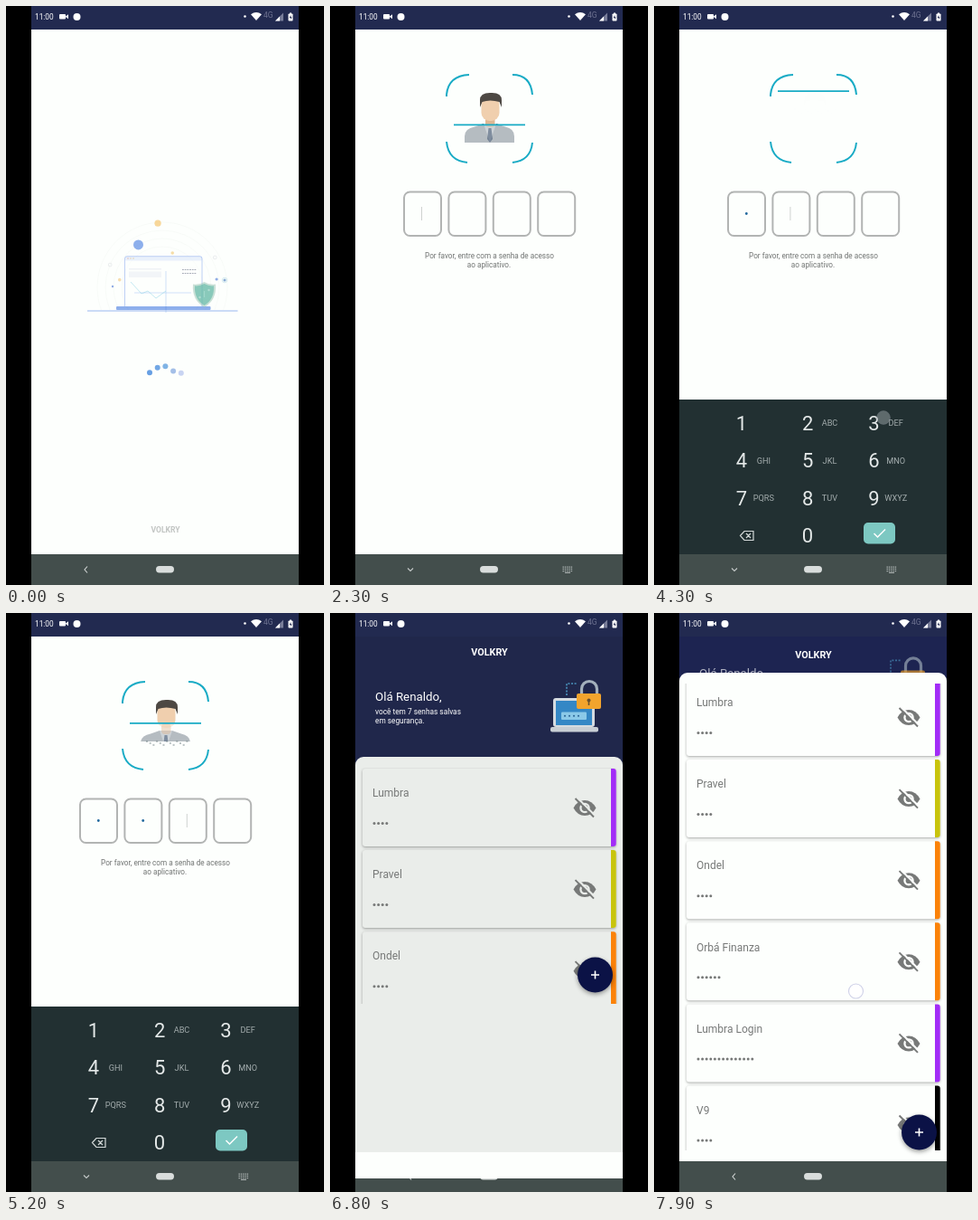
These frames come from a looping animation (352 px wide and 640 px high, 8 s). An HTML page with a canvas:

```html
<!DOCTYPE html>
<html lang="pt">
<head>
<meta charset="utf-8">
<title>Senhas</title>
<style>
html, body { margin: 0; width: 100%; height: 100%; overflow: hidden; background: #000; }
canvas { display: block; width: 352px; height: 640px; }
</style>
</head>
<body>
<canvas id="stage" width="352" height="640"></canvas>
<script>
const ctx = document.getElementById('stage').getContext('2d');
const LOOP = 8000, APP = 'VOLKRY';
const WHITE = '#fdfffd', NAVY = '#222a50', TEAL = '#18abc5';

const clamp = v => Math.max(0, Math.min(1, v));
const ramp = (t, from, to) => clamp((t - from) / (to - from));
const mix = (a, b, p) => a + (b - a) * p;
const smooth = p => p * p * (3 - 2 * p);

function rect(x, y, w, h, fill, r = 0) {
  ctx.fillStyle = fill;
  ctx.beginPath();
  ctx.roundRect(x, y, w, h, r);
  ctx.fill();
}
function dot(x, y, r, fill) {
  ctx.fillStyle = fill;
  ctx.beginPath();
  ctx.arc(x, y, r, 0, 7);
  ctx.fill();
}
function ring(x, y, r, color, width = 1) {
  ctx.strokeStyle = color;
  ctx.lineWidth = width;
  ctx.beginPath();
  ctx.arc(x, y, r, 0, 7);
  ctx.stroke();
}
function stroke(d, color, width = 1) {
  ctx.strokeStyle = color;
  ctx.lineWidth = width;
  ctx.stroke(new Path2D(d));
}
function fill(d, color) {
  ctx.fillStyle = color;
  ctx.fill(new Path2D(d));
}
// y is the middle of the capital letters
function text(s, x, y, size, color, align = 'left', weight = 400) {
  ctx.font = `${weight} ${size}px Roboto, sans-serif`;
  ctx.textAlign = align;
  ctx.fillStyle = color;
  ctx.fillText(s, x, y + size * 0.355);
}
function layer(alpha, draw) {
  if (alpha <= 0) return;
  ctx.save();
  ctx.globalAlpha *= alpha;
  draw();
  ctx.restore();
}
function clipped(x, y, w, h, draw) {
  ctx.save();
  ctx.beginPath();
  ctx.rect(x, y, w, h);
  ctx.clip();
  draw();
  ctx.restore();
}

function statusBar() {
  text('11:00', 32, 12, 8.3, '#fff');
  rect(59, 9, 7, 5.5, '#fff', 1);
  fill('M66 11.5L69 9.3V14.2L66 12Z', '#fff');
  dot(78.5, 12, 4, '#fff');
  dot(264.5, 11.5, 1.3, '#fff');
  fill('M271 9.2Q277 4.7 283 9.2L277 16Z', '#fff');
  text('4G', 285, 10, 8.5, '#6d7290');
  fill('M298 16.5H307V7.5Z', '#777c98');
  fill('M298 16.5H303V11.5Z', '#fff');
  rect(312.5, 8.5, 5, 8, '#fff', 0.8);
  rect(314, 7.5, 2, 1.5, '#fff');
  fill('M315.4 10L313.7 13H315V15L316.5 12.2H315.3Z', NAVY);
}

function navBar(typing) {
  rect(28, 606, 296, 34, '#434e4c');
  rect(166, 619, 20, 7.5, '#d9dddc', 3.7);
  if (!typing) return stroke('M90 619.5L87 623L90 626.5', '#d5d9d8', 1.1);
  stroke('M86 621.5L89 624.5L92 621.5', '#c5cac9', 1.1);
  for (let r = 0; r < 3; r++)
    for (let c = 0; c < 5; c++) rect(257.5 + c * 2.3, 619.5 + r * 2.2, 1.4, 1.3, '#aeb5b4');
  rect(260, 626, 6, 1, '#aeb5b4');
}

// Small bodies circling the laptop: radius, start angle, sweep, size, colour, outlined
const ORBITERS = [
  [71, -94, -5.7, 3.6, '#f3b23f'],
  [54, -119.4, 4.3, 5.5, '#2765dd'],
  [63, -156.7, 10.5, 1.9, '#d9dde0', true],
  [67, -29.6, 10, 1.9, '#d9dde0', true],
  [69.5, -6.6, 10, 2.8, '#b5dbe5', true],
  [69.5, -6.6, 10, 1.6, '#1d5fae'],
  [60.8, -8.5, 4.7, 1.6, '#2d60d0'],
  [48, -170, -18, 1.8, '#efbd67'],
  [55, 181, 0, 1.2, '#2d60d0'],
  [39.6, -73.5, 0, 1.8, '#eebd58']
];

function splash(t) {
  rect(28, 26, 296, 580, WHITE);
  layer(mix(0.52, 1, ramp(t, 0, 450)), () => {
    clipped(90, 230, 170, 106, () => {
      for (const r of [72, 63, 54, 45]) ring(173, 311, r, '#f1f4f1', 0.8);
    });
    rect(131.5, 277, 85.5, 55, WHITE, 2);
    rect(132, 277, 85, 4.5, '#d7e4fa', 1);
    stroke('M131.5 332V279Q131.5 276.7 134 276.7H214.500Q217 276.7 217 279V332', '#84a6ee', 1);
    for (let i = 0; i < 3; i++) dot(135 + i * 3, 279, 0.8, i ? '#e4b66c' : '#e58b72');
    rect(136, 290, 36, 1.5, '#e2e6ef');
    rect(136, 293.5, 36, 6.5, '#e8ebf3');
    ctx.setLineDash([1.8, 0.9]);
    stroke('M195 291.5H211M195 295.5H211', '#545b74', 1.2);
    ctx.setLineDash([]);
    stroke('M177 293V339M142 317H205', '#9bbcf2', 0.9);
    stroke('M138 305L150 318L157 315L166 323L177 315', '#8fd4e6', 1);
    rect(90, 336.2, 166.500, 1.5, '#7ea1ea');
    rect(122, 332, 104.500, 4, '#2967dc', 1);
    fill('M219.500 305Q225 308.500 232 307.500Q233.500 325 219.500 333Q205.500 325 207 307.500Q214 308.500 219.500 305Z', '#9bc4b4');
    fill('M219.500 307Q225 310 230 309.300Q231 324 219.500 331Q208 324 209 309.300Q214 310 219.500 307Z', '#4db59f');
    ring(219.5, 318, 6, '#86cfc0', 0.8);
    stroke('M219.500 315V322', '#b7e5da', 1.2);
    dot(224.5, 314, 1.2, '#d6f0e8');
    dot(214.5, 322, 1.2, '#d6f0e8');
    for (const [radius, start, sweep, size, color, outlined] of ORBITERS) {
      const a = (start + sweep * t / 1600) * Math.PI / 180;
      (outlined ? ring : dot)(173 + radius * Math.cos(a), 311 + radius * Math.sin(a), size, color);
    }
  });
  ['#347fda', '#4389dc', '#569adc', '#86aae0', '#b5c5ed'].forEach((color, i) => {
    const u = clamp(((t + 460) % 1050 - i * 125) / 500);
    layer(mix(0.75, 1, ramp(t, 0, 450)), () =>
      dot(159 + i * 8.7, 405.7 - 8 * Math.sin(Math.PI * u) ** 2, 3, color));
  });
  text(APP, 176.5, 579, 8.6, '#c2c5c3', 'center', 700);
}

function person() {
  fill('M149 151V144Q149 135.500 160 133.500L170 130H184L194 133.500Q204 135.500 204 144V151Z', '#5d6b78');
  fill('M170 130L177 151L184 130Z', '#e9eef1');
  fill('M175.500 135H178.500L180 147L177 151L174 147Z', '#21395a');
  rect(172, 122, 10.500, 12, '#dfb793', 4);
  rect(167.5, 100, 20, 27, '#f0cfae', 9);
  fill('M166 112V104Q166 96 177 96Q190 95 190 104V112L187.500 106Q177 103 168.500 106Z', '#4d4843');
}

function scanner(t) {
  const phase = (t + 500) % 1200 / 600;
  const depth = phase < 1 ? phase : 2 - phase;
  const y = mix(94, 150, depth);
  clipped(140, 90, 75, y - 90, person);
  layer(0.45 * ramp(depth, 0, 0.3), () => {
    clipped(140, y, 75, Math.min(20, 151 - y), person);
    for (let i = 0; i < 13; i++) {
      const py = y + 19 + (i * 7 % 3) * 2;
      if (py < 149) rect(155 + i * 3.7, py, 2, 2, '#6b7c80');
    }
  });
  rect(137, y - 0.9, 79, 1.8, TEAL);
  stroke('M129 100V98Q131 77 154 76M202 76Q222 76 224 98M129 150Q131 171 152 173M224 151Q222 171 202 173', TEAL, 2);
}

// down, up, column, row, touch x, touch y
const PRESSES = [
  [4080, 4270, 2, 0, 254, 455],
  [4720, 4900, 2, 1, 252, 500],
  [5380, 5560, 1, 1, 178, 502],
  [6030, 6220, 0, 1, 102, 502]
];
const LETTERS = ['', 'ABC', 'DEF', 'GHI', 'JKL', 'MNO', 'PQRS', 'TUV', 'WXYZ'];

function keyboard(t) {
  rect(28, 435, 296, 171, '#223032');
  for (const [down, up, col, row] of PRESSES)
    if (t >= down && t < up) rect(66.5 + col * 73.4, 440 + row * 41.3, 73.4, 41.3, '#3a484b');
  LETTERS.forEach((letters, i) => {
    const x = i % 3 * 73.2, y = 461 + Math.floor(i / 3) * 41.4;
    text(i + 1, 97 + x, y, 22, '#e4e8e8', 'center');
    text(letters, 121.3 + x, y, 9.2, '#a4adae', 'center');
  });
  text('0', 170, 585, 22, '#e4e8e8', 'center');
  stroke('M95.500 585.500L100 580.500H110V590.500H100ZM102 583L107 588M107 583L102 588', '#d4d9d9', 1.2);
  rect(232, 571, 35, 23.5, '#7dc8c2', 5);
  stroke('M243.500 583L247.500 587L256 578.500', '#fff', 1.5);
}

function pinScreen(t) {
  rect(28, 26, 296, 580, WHITE);
  scanner(t);
  const typed = PRESSES.filter(p => t >= p[1]).length;
  for (let i = 0; i < 4; i++) {
    const x = 82 + i * 49.4;
    ctx.strokeStyle = '#b2b4b3';
    ctx.lineWidth = 2;
    ctx.beginPath();
    ctx.roundRect(x, 205.5, 41, 48.5, 6.5);
    ctx.stroke();
    if (i < typed) dot(x + 20.3, 229.5, 1.4, '#236a9e');
    if (i === typed) rect(x + 19, 222, 1, 15, '#cfd2d0');
  }
  text('Por favor, entre com a senha de acesso', 176.5, 276, 8.2, '#707372', 'center');
  text('ao aplicativo.', 176, 286, 8.2, '#707372', 'center');
  navBar(true);
  const open = ramp(t, 3080, 3325);
  layer(open, () => {
    ctx.translate(0, 40 * (1 - open));
    keyboard(t);
  });
  for (const [down, up, , , x, y] of PRESSES)
    if (t >= down) touch(x, y, 1 - ramp(t, up, up + 100), '#aab2b6');
}

function touch(x, y, alpha, color) {
  layer(alpha * 0.65, () => {
    dot(x, y, 7.5, color);
    ring(x, y, 7.5, '#777f88', 0.8);
  });
}

function lockedLaptop() {
  rect(247, 94, 46, 32, '#d5dbe0', 3);
  rect(250, 97, 40, 27, '#3487c5');
  rect(256, 109.5, 28, 8.5, '#8bc9e8', 1);
  for (let i = 0; i < 4; i++) dot(260 + i * 5, 113.8, 1, '#285f91');
  rect(244, 126, 53, 5.5, '#c8ced4', 2);
  ctx.setLineDash([2, 1.6]);
  stroke('M262 91V78H273', '#4a94bf', 1.6);
  ctx.setLineDash([]);
  stroke('M278.500 91V84A8.500 8.500 0 0 1 295.500 84V91', '#a3b0bc', 3.2);
  rect(273, 89, 27, 17, '#f2a42d', 2);
  dot(286.5, 96.5, 2, '#6b522e');
  rect(285.7, 97, 1.6, 5, '#6b522e');
}

function hiddenEye(x, y, back) {
  ctx.save();
  ctx.translate(x, y);
  fill('M-12.500 0Q-8 -8.500 0 -8.500T12.500 0Q8 8.500 0 8.500T-12.500 0Z', '#777978');
  dot(0, 0, 5.7, back);
  dot(0, 0, 3.4, '#777978');
  stroke('M-8.500 -11.500L11.500 8.500', back, 2.2);
  stroke('M-10.500 -10.500L10 10', '#777978', 1.9);
  ctx.restore();
}

const CARDS = [
  ['Lumbra', 4, '#a22cf7'],
  ['Pravel', 4, '#c8c40c'],
  ['Ondel', 4, '#fb8209'],
  ['Orbá Finanza', 6, '#fb8209'],
  ['Lumbra Login', 14, '#a22cf7'],
  ['V9', 4, '#000']
];

function card([name, dots, color], y, back) {
  ctx.save();
  ctx.shadowColor = 'rgba(0,0,0,.35)';
  ctx.shadowBlur = 3;
  ctx.shadowOffsetY = 1;
  rect(36, y, 280.5, 86, back, 3);
  ctx.restore();
  rect(311, y, 5.7, 86, color, [0, 3, 3, 0]);
  text(name, 47, y + 27, 12, '#777978');
  for (let i = 0; i < dots; i++) dot(49 + i * 4.6, y + 60.5, 1.5, '#777978');
  hiddenEye(282, y + 43.5, back);
}

function listScreen(t) {
  const settled = t >= 6900;
  const drag = smooth(ramp(t, 7200, 7900));
  const scroll = 100 * drag, lift = Math.min(scroll, 93);
  const back = settled ? WHITE : '#eaedea';
  const sheetTop = 159 - lift, bottom = settled ? 594 : 432;

  rect(28, 26, 296, 580, settled ? '#1d2451' : '#20274b');
  clipped(28, 26, 296, 200, () => {
    ctx.translate(0, -lift * 0.275);
    layer(1 - 0.35 * drag, () => {
      text('Olá Renaldo,', 50, 92, 13.3, '#fff');
      text('você tem 7 senhas salvas', 50, 109.5, 8.3, '#fff');
      text('em segurança.', 50, 119.5, 8.3, '#fff');
      lockedLaptop();
    });
  });
  text(APP, 176.5, 43 + 3 * drag, 10.8, '#fff', 'center', 700);

  navBar(false);
  rect(28, sheetTop, 296, 606 - sheetTop, back, [9, 9, 0, 0]);
  if (!settled) rect(28, 596, 296, 29, WHITE);
  clipped(28, sheetTop + 12, 296, bottom - sheetTop - 12, () =>
    CARDS.forEach((c, i) => card(c, 172 + i * 90.1 - scroll, back)));

  const fabY = settled ? 574 : 400;
  ctx.save();
  ctx.shadowColor = 'rgba(0,0,0,.4)';
  ctx.shadowBlur = 5;
  ctx.shadowOffsetY = 2;
  dot(293.5, fabY, 19.5, '#0b1246');
  ctx.restore();
  stroke(`M289 ${fabY}H298M293.500 ${fabY - 4.5}V${fabY + 4.5}`, '#fff', 1.6);

  if (t >= 7150) layer(0.8, () => {
    dot(223.5, 518 - scroll, 8, '#fff');
    ring(223.5, 518 - scroll, 8, '#c3c5e2', 1.1);
  });
}

function render(now) {
  const t = now % LOOP;
  rect(0, 0, 352, 640, '#000');
  const toPin = ramp(t, 2000, 2250), toList = ramp(t, 6380, 6620);
  if (toPin < 1) {
    splash(t);
    navBar(false);
  }
  if (toList < 1) layer(toPin, () => pinScreen(t));
  layer(toList, () => listScreen(t));
  rect(28, 0, 296, 26, NAVY);
  statusBar();
}

const start = performance.now();
function tick() {
  render(performance.now() - start);
  requestAnimationFrame(tick);
}
tick();
</script>
</body>
</html>
```
